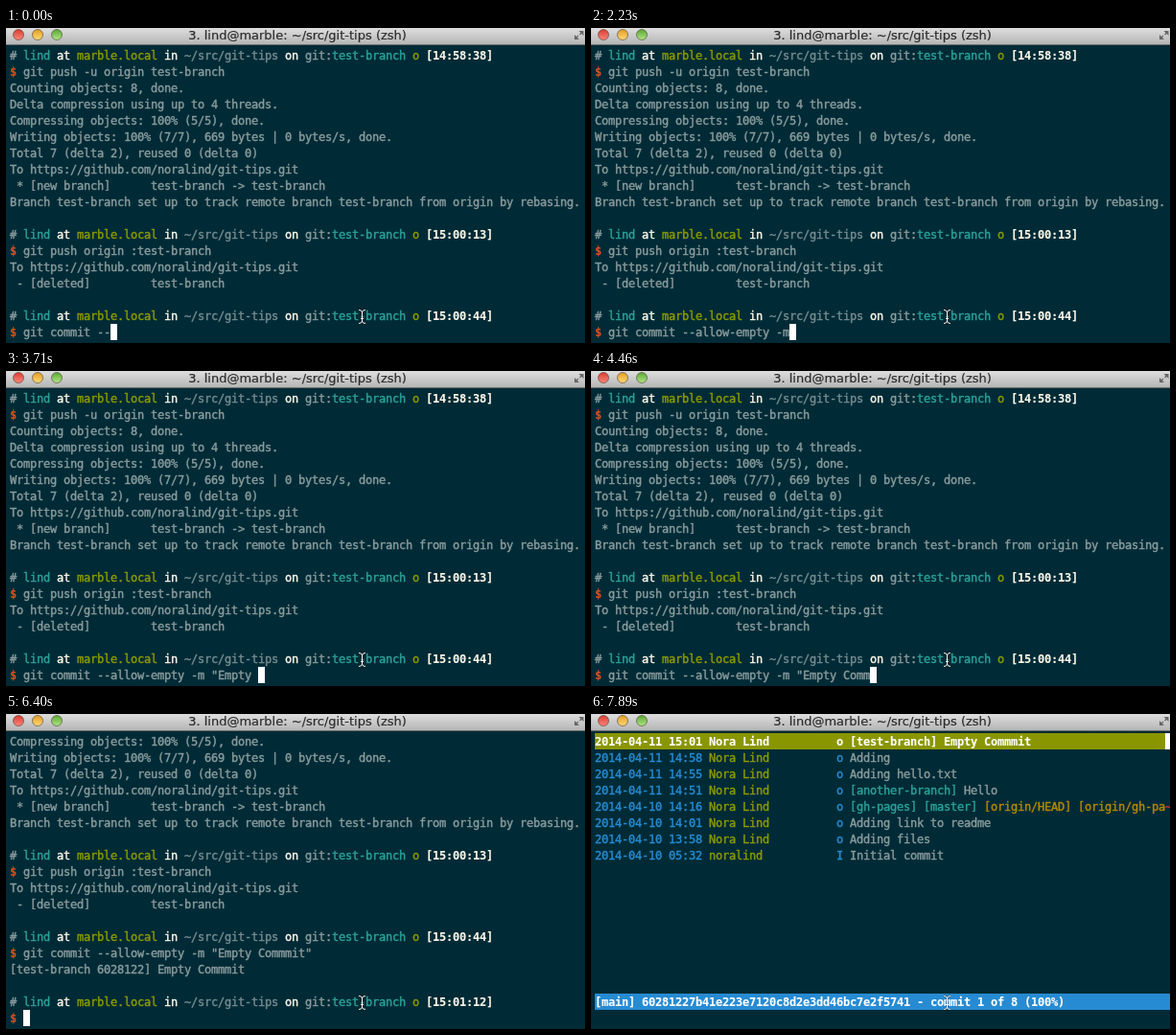
These frames come from a looping animation (604 by 329 pixels, 8 s). An HTML page with a canvas:

```html
<!DOCTYPE html>
<html lang="en">
<head>
<meta charset="utf-8">
<title>Terminal</title>
<style>
  html, body { margin: 0; width: 100%; height: 100%; overflow: hidden; background: #002b36; }
  canvas { display: block; }
</style>
</head>
<body>
<canvas id="stage" width="604" height="329"></canvas>
<script>
const ctx = document.getElementById('stage').getContext('2d');
const LOOP = 8000, LEFT = 4, TOP = 20, CELL = 7, ROW = 17, BAR = 18;
const MONO = '12px "DejaVu Sans Mono", monospace';
const C = {
  bg: '#002b36', text: '#8a9b9d', dim: '#768b90', white: '#fdf8ea', cyan: '#2aa198',
  olive: '#8c9a00', blue: '#268bd2', amber: '#b58900', red: '#dc322f', orange: '#d5501e'
};

// A line is a list of [text, colour, bold] runs.
const plain = s => [[s, C.text]];
const prompt = time => [
  ['# ', C.text], ['lind ', C.cyan], ['at ', C.white], ['marble.local ', C.olive],
  ['in ', C.white], ['~/src/git-tips ', C.dim], ['on ', C.white], ['git:', C.text],
  ['test-branch ', C.cyan], ['o ', C.olive], [`[${time}]`, C.white, true]
];
const command = s => [['$ ', C.orange, true], [s, C.text]];

const COMMIT = 'git commit --allow-empty -m "Empty Commmit"';
const REMOTE = 'To https://github.com/noralind/git-tips.git';
const history = [
  prompt('14:58:38'),
  command('git push -u origin test-branch'),
  ...[
    'Counting objects: 8, done.',
    'Delta compression using up to 4 threads.',
    'Compressing objects: 100% (5/5), done.',
    'Writing objects: 100% (7/7), 669 bytes | 0 bytes/s, done.',
    'Total 7 (delta 2), reused 0 (delta 0)',
    REMOTE,
    ' * [new branch]      test-branch -> test-branch',
    'Branch test-branch set up to track remote branch test-branch from origin by rebasing.',
    ''
  ].map(plain),
  prompt('15:00:13'),
  command('git push origin :test-branch'),
  ...[REMOTE, ' - [deleted]         test-branch', ''].map(plain),
  prompt('15:00:44')
];
const committed = [
  ...history.slice(4),
  command(COMMIT),
  plain('[test-branch 6028122] Empty Commmit'),
  plain(''),
  prompt('15:01:12')
];

const entry = (date, author, mark, ...title) => [
  [`2014-04-${date} `, C.blue], [author.padEnd(19), C.olive], [mark + ' ', C.blue], ...title
];
const NAME = 'Nora Lind';
const log = [
  entry('11 15:01', NAME, 'o', ['[test-branch] Empty Commmit']).map(([s]) => [s, '#fff', true]),
  entry('11 14:58', NAME, 'o', ['Adding', C.text]),
  entry('11 14:55', NAME, 'o', ['Adding hello.txt', C.text]),
  entry('11 14:51', NAME, 'o', ['[another-branch] ', C.cyan], ['Hello', C.text]),
  entry('10 14:16', NAME, 'o', ['[gh-pages] [master] ', C.cyan],
    ['[origin/HEAD] [origin/gh-pa', C.amber], ['~', C.red]),
  entry('10 14:01', NAME, 'o', ['Adding link to readme', C.text]),
  entry('10 13:58', NAME, 'o', ['Adding files', C.text]),
  entry('10 05:32', 'noralind', 'I', ['Initial commit', C.text])
];
const STATUS = '[main] 60281227b41e223e7120c8d2e3dd46bc7e2f5741 - commit 1 of 8 (100%)';

// [time in ms, characters typed]
const commitKeys = [
  [0, 13], [150, 14], [300, 15], [450, 16],
  [1050, 18], [1200, 19], [1350, 20], [1500, 21], [1650, 22], [1800, 24], [1940, 25], [2090, 26],
  [2230, 27], [2380, 28], [2530, 29],
  [3120, 30], [3270, 32], [3420, 33], [3560, 34], [3710, 35],
  [4010, 36], [4160, 38], [4460, 39], [4910, 42], [5810, 43]
];
const tigKeys = [[6400, 0], [7600, 1], [7750, 3]];
const typed = (keys, t) => keys.filter(k => k[0] <= t).pop()[1];

function box(col, row, cols, color) {
  ctx.fillStyle = color;
  ctx.fillRect(LEFT + col * CELL, TOP + row * ROW, cols * CELL, ROW);
}

// A hairline outline gives the heavier smoothing of the terminal's text.
function ink(text, x, y, color, weight) {
  ctx.fillStyle = ctx.strokeStyle = color;
  ctx.lineWidth = weight;
  ctx.fillText(text, x, y);
  ctx.strokeText(text, x, y);
}

function drawLine(runs, row) {
  let x = LEFT;
  for (const [text, color, bold] of runs) {
    ctx.font = (bold ? 'bold ' : '') + MONO;
    for (const ch of text) {
      ink(ch, x, TOP + row * ROW + 13, color, bold ? 0.1 : 0.4);
      x += CELL;
    }
  }
}

function drawShell(lines, input) {
  lines.forEach(drawLine);
  drawLine(command(input), 17);
  box(2 + input.length, 17, 1, '#fff');
}

function drawLog() {
  box(0, 0, 85, '#8a9600');
  box(85, 0, 1, '#fff');
  log.forEach(drawLine);
  box(0, 16, 86, C.blue);
  drawLine([[STATUS, '#fff', true]], 16);
}

function shade(y0, y1, from, to) {
  const g = ctx.createLinearGradient(0, y0, 0, y1);
  g.addColorStop(0, from);
  g.addColorStop(1, to);
  return g;
}

function drawTitleBar() {
  ctx.fillStyle = shade(0, BAR, '#dedede', '#b3b3b3');
  ctx.fillRect(0, 0, 604, BAR);
  ctx.fillStyle = '#6b6b6b';
  ctx.fillRect(0, BAR - 1, 604, 1);
  const lights = [['#d8382f', '#ff8a7c'], ['#e09a22', '#ffdc78'], ['#57a52f', '#b5e88a']];
  lights.forEach(([dark, light], i) => {
    ctx.beginPath();
    ctx.arc(13 + 20 * i, 7, 5.5, 0, Math.PI * 2);
    ctx.fillStyle = shade(1, 13, dark, light);
    ctx.fill();
    ctx.strokeStyle = 'rgba(70, 50, 40, .55)';
    ctx.lineWidth = 1;
    ctx.stroke();
  });
  ctx.font = '13px "DejaVu Sans", sans-serif';
  ctx.textAlign = 'center';
  ink('3. lind@marble: ~/src/git-tips (zsh)', 304, 12, '#2c2c2c', 0.2);
  ctx.textAlign = 'left';
  ctx.fillStyle = '#666';
  ctx.fill(new Path2D('M593 7L598 12H593ZM597.5 3H602.5V8Z'));
  ctx.strokeStyle = '#666';
  ctx.lineWidth = 1.2;
  ctx.stroke(new Path2D('M594 11L597 8M598.5 7L601.5 4'));
}

function drawPointer() {
  const beam = new Path2D('M368 294.5Q371.5 294.5 371.5 297V306Q371.5 308.5 368 308.5' +
    'M375 294.5Q371.5 294.5 371.5 297M371.5 306Q371.5 308.5 375 308.5M370 303.5H373');
  for (const [color, width] of [['rgba(0, 0, 0, .4)', 2.4], ['#fff', 1]]) {
    ctx.strokeStyle = color;
    ctx.lineWidth = width;
    ctx.stroke(beam);
  }
}

function frame(now) {
  const t = now % LOOP;
  ctx.fillStyle = C.bg;
  ctx.fillRect(0, 0, 604, 329);
  if (t < 6400) drawShell(history, COMMIT.slice(0, typed(commitKeys, t)));
  else if (t < 7890) drawShell(committed, 'tig'.slice(0, typed(tigKeys, t)));
  else drawLog();
  drawTitleBar();
  drawPointer();
  requestAnimationFrame(frame);
}
ctx.lineJoin = 'round';
frame(0);
</script>
</body>
</html>
```
